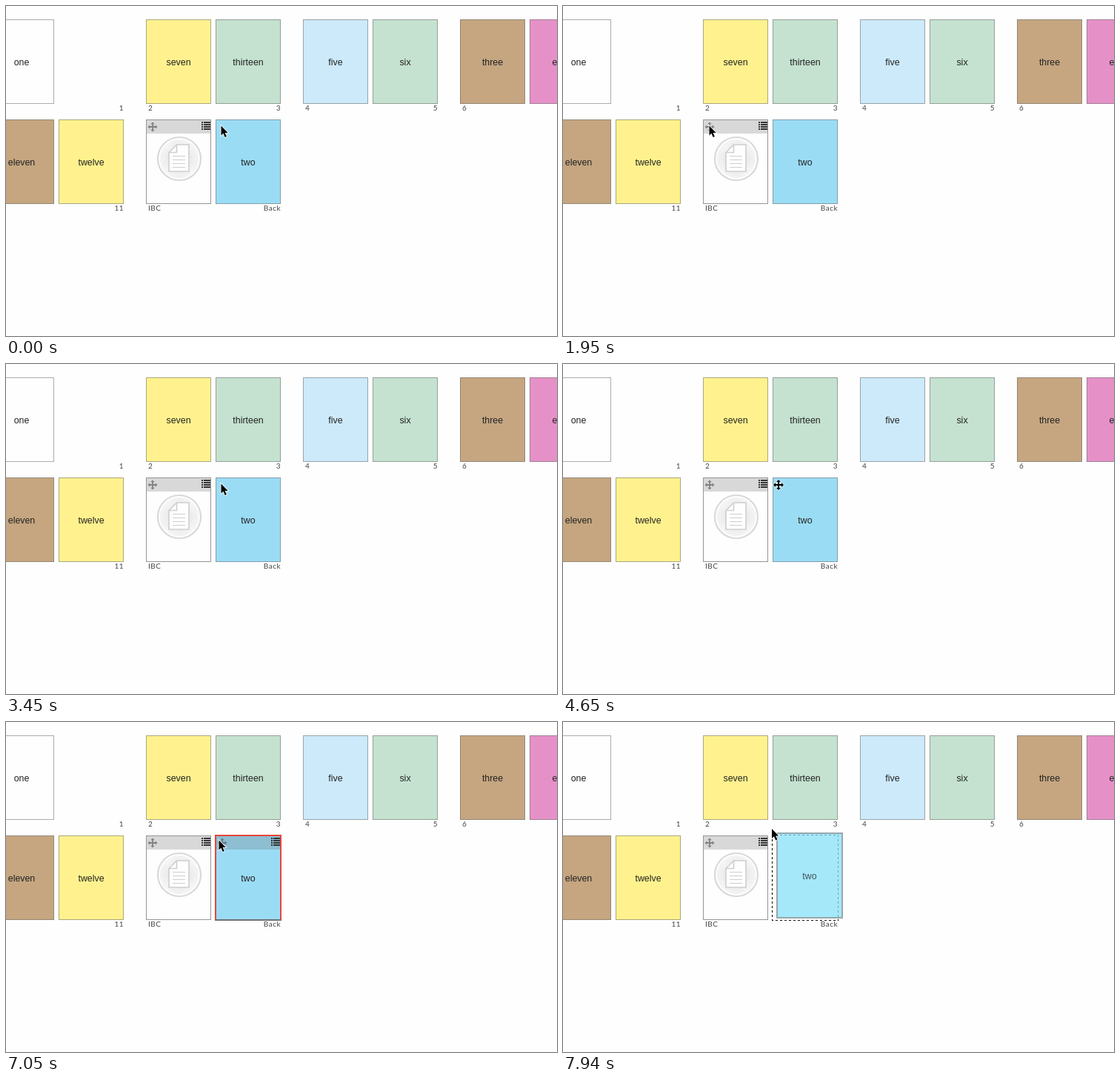
Recreate the animation shown at these times as an HTML page with a canvas. Size 744 px wide and 445 px high, loop 8 s.

```html
<!DOCTYPE html>
<html lang="en">
<head>
<meta charset="utf-8">
<title>Page planner</title>
<style>
  html, body { margin: 0; width: 744px; height: 445px; overflow: hidden; background: #fefefe; }
  canvas { display: block; }
</style>
</head>
<body>
<canvas id="stage" width="744" height="445"></canvas>
<script>
const ctx = document.getElementById('stage').getContext('2d');
const LOOP = 8000, STEP = 150, W = 88, H = 114;
const GRAB = 4650, HOVER = 4800, SELECT = 5700, RELEASE = 6750, DRAG = 7200;
const WORD_FONT = '12.4px "Liberation Sans", Arial, sans-serif';
const LABEL_FONT = '10px Lato, sans-serif';

// Two pages to a spread, spreads side by side in each row
const rows = [
  { words: 'one,,seven,thirteen,five,six,three,eight', labels: ',1,2,3,4,5,6' },
  { words: 'eleven,twelve,blank,two', labels: ',11,IBC,Back' }
];
const fills = {
  one: '#fefefe', blank: '#fefefe', seven: '#fff28e', twelve: '#fff28e',
  thirteen: '#c5e2d0', six: '#c5e2d0', five: '#cdeafa', three: '#c5a680',
  eleven: '#c5a680', eight: '#e591c8', two: '#9bdcf5'
};
const pageX = i => -23 + 212 * Math.floor(i / 2) + 94 * (i % 2);
const pageY = row => 18 + 135 * row;

// Pointer moves from rest: start, end, x, y reached
const home = [290, 161];
const moves = [
  [300, 750, 358, 172], [750, 1350, 221, 162], [1350, 1950, 197, 161],
  [2400, 2850, 268, 160], [2850, 3450, ...home], [4500, GRAB, 291, 163],
  [6600, 7050, 287, 159], [7050, 7500, 285, 152.5], [7500, 7950, 281.5, 143.5]
];

const arrow = new Path2D('M.5.5V13.5L3.4 10.8L5.7 16L7.9 15L5.6 10H9.7Z');
const cross = new Path2D('M0-7L3-4H1V-1H4V-3L7 0L4 3V1H1V4H3L0 7L-3 4H-1V1H-4V3L-7 0L-4-3V-1H-1V-4H-3Z');
const sheet = new Path2D('M230.5 187H247V223H220V197.5ZM230.5 187V197.5H220');

function pointerAt(t) {
  let [x, y] = home;
  for (const [start, end, toX, toY] of moves) {
    const p = Math.min(1, Math.max(0, (t - start) / (end - start)));
    const ease = end < GRAB ? Math.sin(p * Math.PI / 2) : p;
    x += (toX - x) * ease;
    y += (toY - y) * ease;
  }
  return [x, y];
}

function rect(x, y, w, h, fill) {
  ctx.fillStyle = fill;
  ctx.fillRect(x, y, w, h);
}

function frameRect(x, y, w, h, color, width = 1) {
  ctx.strokeStyle = color;
  ctx.lineWidth = width;
  ctx.strokeRect(x + width / 2, y + width / 2, w - width, h - width);
}

function text(str, x, y, font, color, align) {
  ctx.font = font;
  ctx.fillStyle = color;
  ctx.textAlign = align;
  ctx.fillText(str, x, y);
}

function shape(path, x, y, fill, outline, scale = 1) {
  ctx.save();
  ctx.translate(x, y);
  ctx.scale(scale, scale);
  if (outline) {
    ctx.strokeStyle = outline;
    ctx.lineWidth = 1.6;
    ctx.stroke(path);
  }
  ctx.fillStyle = fill;
  ctx.fill(path);
  ctx.restore();
}

function card(x, y, word) {
  rect(x, y, W, H, fills[word]);
  frameRect(x, y, W, H, 'rgba(115,115,115,.58)');
  if (word === 'blank') medallion(x + 45, y + 53);
  else text(word, x + 44, y + 62, WORD_FONT, '#222', 'center');
}

function toolbar(x, y) {
  frameRect(x, y, W, H, 'rgba(0,0,0,.13)');
  rect(x + 1, y + 1, W - 2, 18, 'rgba(100,100,100,.25)');
  shape(cross, x + 9, y + 10, 'rgba(85,85,85,.65)', null, .92);
  for (let i = 0; i < 4; i++) {
    rect(x + 75, y + 3 + i * 3, 2, 2, '#333');
    rect(x + 78, y + 3 + i * 3, 9, 2, '#333');
  }
}

function medallion(x, y) {
  ctx.strokeStyle = '#d9d9d9';
  ctx.lineWidth = 2.2;
  ctx.beginPath();
  ctx.arc(x, y, 29, 0, 7);
  ctx.stroke();
  ctx.lineWidth = .7;
  ctx.beginPath();
  for (let i = 0; i < 72; i++) {
    const c = Math.cos(i * Math.PI / 36), s = Math.sin(i * Math.PI / 36);
    ctx.moveTo(x + c * 14, y + s * 14);
    ctx.lineTo(x + c * 26, y + s * 26);
  }
  ctx.stroke();
  ctx.fillStyle = '#fefefe';
  ctx.fill(sheet);
  ctx.strokeStyle = '#cecece';
  ctx.lineWidth = 1.6;
  ctx.stroke(sheet);
  for (let i = 0; i < 4; i++) rect(x - 9, y - 4 + i * 5, 17, 1, '#cecece');
}

function selection(x, y) {
  frameRect(x, y, 90, 116, '#e8463c', 2);
  rect(x, y + 114, 90, 2, '#6f7274');
}

function dashedLine(x1, y1, x2, y2, offset) {
  ctx.lineDashOffset = offset;
  ctx.beginPath();
  ctx.moveTo(x1, y1);
  ctx.lineTo(x2, y2);
  ctx.stroke();
}

function placeholder(x, y) {
  ctx.strokeStyle = '#000';
  ctx.lineWidth = 1;
  ctx.setLineDash([3, 3]);
  for (const lineY of [y + .5, y + 115.5]) dashedLine(x, lineY, x + 90, lineY, 1);
  for (const lineX of [x + .5, x + 89.5]) dashedLine(lineX, y, lineX, y + 116, 0);
  ctx.setLineDash([]);
}

function draggedCard(x, y) {
  ctx.globalAlpha = .75;
  rect(x, y, 90, 116, '#87e0f8');
  frameRect(x, y, 90, 116, '#929292', 2);
  text('two', x + 45, y + 63, WORD_FONT, '#222', 'center');
  ctx.globalAlpha = 1;
}

function drawRow({ words, labels }, row) {
  const y = pageY(row);
  words.split(',').forEach((word, i) => word && word !== 'two' && card(pageX(i), y, word));
  ctx.letterSpacing = '.5px';
  labels.split(',').forEach((label, i) => {
    const right = i % 2;
    text(label, pageX(i) + (right ? W : 3), y + 123, LABEL_FONT, '#444', right ? 'right' : 'left');
  });
  ctx.letterSpacing = '0px';
}

function draw(time) {
  // The picture advances in steps; the last ones land slightly early
  const t = Math.floor((time + 10) / STEP) * STEP;
  const [x, y] = pointerAt(t);
  rect(0, 0, 744, 445, '#fefefe');
  rows.forEach(drawRow);
  toolbar(pageX(2), pageY(1));

  const twoX = pageX(3), twoY = pageY(1);
  if (t < DRAG) {
    card(twoX, twoY, 'two');
    if (t >= HOVER) toolbar(twoX, twoY);
    if (t >= SELECT) selection(twoX - 1, twoY - 1);
  } else {
    placeholder(twoX - 1, twoY - 1);
    draggedCard(Math.floor(x + 6.5), Math.floor(y + 6));
  }

  const moving = t >= GRAB && t < RELEASE;
  shape(moving ? cross : arrow, x, y, '#000', moving ? 'rgba(255,255,255,.6)' : '#fff');
}

function frame(now) {
  draw(now % LOOP);
  requestAnimationFrame(frame);
}
requestAnimationFrame(frame);
</script>
</body>
</html>
```
